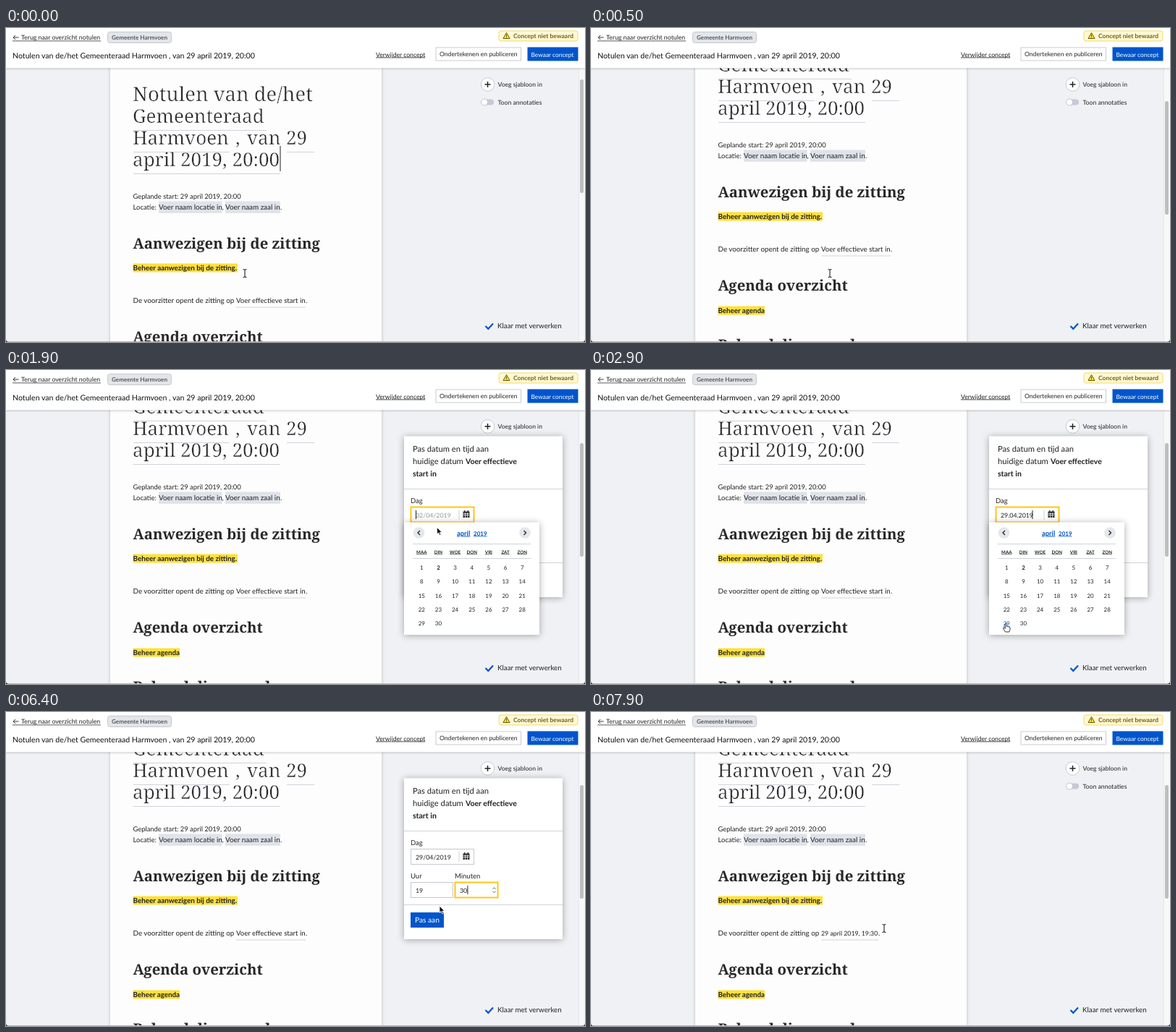
An HTML page for the animation above (8000 ms loop, 800 by 434 pixels).

```html
<!DOCTYPE html>
<html lang="nl">
<head>
<meta charset="utf-8">
<title>Notulen</title>
<style>
html, body { margin: 0; width: 100%; height: 100%; overflow: hidden; background: #eff1f4; }
svg { display: block; width: 800px; height: 434px; }
text { font-family: Lato, "Open Sans", sans-serif; fill: #222; white-space: pre; text-rendering: geometricPrecision; }
.serif { font-family: "Noto Serif", "Liberation Serif", serif; fill: #282828; }
.light { font-weight: 300; stroke: #fdfdfe; stroke-width: .5px; }
.bold { font-weight: 700; }
.link { text-decoration: underline; }
.mid { text-anchor: middle; }
.shadow { filter: drop-shadow(0 1px 5px rgba(0, 0, 0, .33)); }
</style>
</head>
<body>
<svg id="stage" viewBox="0 0 800 434"></svg>
<script>
const LOOP = 8000;
const BLUE = '#0055cc', YELLOW = '#ffc515', LINE = '#cfd3da';
const stage = document.getElementById('stage');

function add(parent, tag, attrs = {}, content) {
  const node = document.createElementNS('http://www.w3.org/2000/svg', tag);
  for (const key in attrs) node.setAttribute(key, attrs[key]);
  if (content !== undefined) node.textContent = content;
  return parent.appendChild(node);
}
const group = (parent, attrs) => add(parent, 'g', attrs);
const rect = (parent, x, y, width, height, fill, extra) =>
  add(parent, 'rect', { x, y, width, height, fill, ...extra });
const box = (parent, x, y, w, h, fill, stroke, extra) =>
  rect(parent, x + .5, y + .5, w - 1, h - 1, fill, { stroke, ...extra });
const text = (parent, x, y, size, content, cls = '', fill) =>
  add(parent, 'text', { x, y, 'font-size': size, class: cls, ...(fill && { style: `fill:${fill}` }) }, content);
const path = (parent, d, stroke, width = 1, fill = 'none') =>
  add(parent, 'path', { d, stroke, 'stroke-width': width, fill });
const show = (node, on) => node.setAttribute('visibility', on ? 'visible' : 'hidden');

// Page
rect(stage, 0, 0, 800, 434, '#eff1f4');
rect(stage, 144, 40, 375, 410, '#fdfdfe', { style: 'filter:drop-shadow(0 0 2px rgba(0,0,0,.22))' });
const doc = group(stage);
const LEFT = 175.5;
const underline = (x, y, w) => rect(doc, x, y, w, 1, LINE);
const titlePart = (x, y, content, size = 26) => text(doc, x, y, size, content, 'serif light');
const heading = (y, content) => text(doc, LEFT, y, 20.3, content, 'serif bold');

underline(176, 141, 184);
underline(176, 171, 133);
underline(388, 171, 38);
underline(176, 201, 203);
titlePart(175, 101, 'Notulen van de/het', 27.4);
titlePart(175, 130.5, 'Gemeenteraad');
titlePart(175, 160.5, 'Harmvoen');
titlePart(317, 160.5, ',');
titlePart(333, 160.5, 'van');
titlePart(387, 160.5, '29');
titlePart(175, 190.5, 'april 2019, 20:00');
const titleCaret = rect(doc, 378.5, 163, 1, 35, '#222');

text(doc, LEFT, 235.7, 9.4, 'Geplande start: 29 april 2019, 20:00');
text(doc, LEFT, 250.5, 9.5, 'Locatie:');
for (const [x, w, label, end] of [[211, 87.5, 'Voer naam locatie in', ','], [303, 76, 'Voer naam zaal in', '.']]) {
  rect(doc, x, 239.5, w, 15, '#dfe3ea');
  underline(x, 254.5, w);
  text(doc, x, 250.5, 9.9, label);
  text(doc, x + w, 250.5, 9.6, end);
}
heading(304.7, 'Aanwezigen bij de zitting');
rect(doc, 175.5, 325.5, 144.5, 12, '#ffe03d');
text(doc, LEFT, 335, 9.87, 'Beheer aanwezigen bij de zitting.', 'bold');
text(doc, LEFT, 380, 9.8, 'De voorzitter opent de zitting op');
const startText = text(doc, 318, 380, 9.6, '');
const startStop = text(doc, 414, 380, 9.6, '.');
const startLine = underline(318, 385.5, 96);
const startCaret = rect(doc, 356, 370, 1, 13, '#222');
heading(434, 'Agenda overzicht');
rect(doc, 175.5, 455.5, 64.5, 12, '#ffe03d');
text(doc, LEFT, 465, 9.75, 'Beheer agenda', 'bold');
heading(516, 'Behandeling van de');

// Scroll bar
rect(stage, 791, 56, 9, 378, '#f8f8f9');
rect(stage, 791, 56, 1, 378, '#e6e7e9');
const thumb = rect(stage, 793, 71, 5, 157, '#bdbec0', { rx: 2.5 });

// Header
rect(stage, 0, 0, 800, 55.5, '#fff', { style: 'filter:drop-shadow(0 1px 1px rgba(0,0,0,.22))' });
path(stage, 'M17.5 13H10M13 10L10 13L13 16', '#222', .9);
text(stage, 21, 16, 8.75, 'Terug naar overzicht notulen');
rect(stage, 9, 17.5, 122, .8, '#333');
box(stage, 140, 5, 89, 16, '#e3e5e8', '#c6c9ce', { rx: 3 });
text(stage, 146, 16.3, 8.1, 'Gemeente Harmvoen', 'bold', '#555b63');
text(stage, 9, 41.5, 10.6, 'Notulen van de/het Gemeenteraad Harmvoen , van 29 april 2019, 20:00', '', '#111');

const actions = group(stage, { transform: 'translate(0 -.5)' });
text(actions, 511, 40, 8.6, 'Verwijder concept', 'link');
box(actions, 593.5, 27, 118.5, 19, '#fff', '#c9ccd1');
text(actions, 599, 39.5, 8.6, 'Ondertekenen en publiceren');
rect(actions, 720.5, 27, 70, 19, BLUE);
text(actions, 725.5, 40, 8.4, 'Bewaar concept', '', '#fff');
box(actions, 680.5, 4, 110, 15, '#fff9d5', '#f2da6b', { rx: 3 });
path(actions, 'M691.5 7L696 15H687Z', '#6b5700', 1, '#ffdf3c');
path(actions, 'M691.5 9.5V12.3M691.5 13V14', '#4d3f00', .9);
text(actions, 701, 14.5, 8.5, 'Concept niet bewaard', 'bold', '#75601a');

// Side tools
add(stage, 'circle', { cx: 665.5, cy: 78, r: 9.3, fill: '#fff', stroke: '#c7cbd1' });
path(stage, 'M661.5 78H669.5M665.5 74V82', '#222', 1.5);
text(stage, 679.5, 81.2, 8.55, 'Voeg sjabloon in');
rect(stage, 657, 98.5, 17, 8, '#c5cad6', { rx: 4 });
add(stage, 'circle', { cx: 661, cy: 102.5, r: 4.5, fill: '#fff', stroke: '#b4b9c3', 'stroke-width': .8 });
text(stage, 679.5, 105.7, 8.7, 'Toon annotaties');
path(stage, 'M662.5 412L666.3 415.8L673 408.5', BLUE, 2.2);
text(stage, 679, 415.2, 9.8, 'Klaar met verwerken');

// Date panel
const panel = group(stage);
rect(panel, 550, 91.5, 219, 222.5, '#fff', { class: 'shadow' });
text(panel, 562, 112.5, 11.2, 'Pas datum en tijd aan');
text(panel, 562, 129.5, 11.2, 'huidige datum');
text(panel, 635, 129.5, 10.5, 'Voer effectieve', 'bold');
text(panel, 562, 146.5, 10.5, 'start in', 'bold');
rect(panel, 550, 164, 219, 1, LINE);
rect(panel, 550, 266, 219, 1, LINE);

function field(x, y, w, label, placeholder) {
  text(panel, x, y - 5, 9.5, label);
  const frame = rect(panel, x + .5, y + .5, w - 1, 21, '#fff');
  const value = text(panel, x + 7, y + 14.5, 8.8, placeholder);
  const caret = rect(panel, 0, y + 5, 1, 12, '#222');
  return (content, focused, caretX) => {
    frame.setAttribute('stroke', focused ? YELLOW : '#c4c8ce');
    frame.setAttribute('stroke-width', focused ? 2 : 1);
    value.textContent = content || placeholder;
    value.style.fill = content ? '#222' : '#999';
    caret.setAttribute('x', caretX || 0);
    show(caret, panelOpen && caretX);
  };
}
let panelOpen = false;
const setDay = field(559, 189, 88, 'Dag', '02/04/2019');
const setHour = field(559, 235, 59, 'Uur', '12');
const setMinute = field(620, 235, 60, 'Minuten', '00');

rect(panel, 625.5, 193, 1, 14, LINE);
box(panel, 631.5, 195.5, 9, 8.5, '#333', '#333');
path(panel, 'M632 198.5H640M632 200.7H640M634.5 197.5V204M637.5 197.5V204', '#fff', .7);
path(panel, 'M633.7 194V197M638.3 194V197', '#333', 1.4);

const spinner = x => path(panel, `M${x - 2} 245L${x} 242.5L${x + 2} 245M${x - 2} 247.5L${x} 250L${x + 2} 247.5`, '#777', 1);
const hourSpinner = spinner(613.5), minuteSpinner = spinner(674.5);
const button = rect(panel, 559, 277, 46, 21, '#b9c1cc');
text(panel, 565, 291, 10.2, 'Pas aan', '', '#fff');

// Calendar
const calendar = group(stage);
rect(calendar, 550, 210.5, 187, 155.5, '#fff', { class: 'shadow' });
for (const [x, dir] of [[570.5, -1], [717, 1]]) {
  add(calendar, 'circle', { cx: x, cy: 225, r: 7.8, fill: '#e4e7eb' });
  path(calendar, `M${x - dir * 1.5} 222L${x + dir * 1.5} 225L${x - dir * 1.5} 228`, '#222', 1.3);
}
text(calendar, 623, 228.5, 9.4, 'april', 'bold link', BLUE);
text(calendar, 646, 228.5, 8, '2019', 'bold link', BLUE);
rect(calendar, 562, 240, 163, 1, LINE);
rect(calendar, 562, 260, 163, 1, LINE);
const column = i => 574.3 + i * 23.15;
['MAA', 'DIN', 'WOE', 'DON', 'VRI', 'ZAT', 'ZON'].forEach((day, i) =>
  text(calendar, column(i), 253.5, 6.2, day, 'mid bold link'));
const days = [];
for (let n = 1; n <= 30; n++) {
  const row = Math.floor((n - 1) / 7);
  days[n] = text(calendar, column((n - 1) % 7), 275.8 + row * 19.4, 7.9, n, n === 2 ? 'mid bold' : 'mid');
}

// Window edge
rect(stage, 0, 433, 800, 1, '#b5b7ba');
add(stage, 'path', { d: 'M0 430Q0 434 4 434H0ZM800 430Q800 434 796 434H800Z', fill: '#222' });

// Pointer shapes
const cursor = group(stage);
const beam = group(cursor), arrow = group(cursor), hand = group(cursor);
const beamShape = 'M-2.5 -5.5Q0 -5.5 0 -4Q0 -5.5 2.5 -5.5M0 -4.5V4.5M-2.5 5.5Q0 5.5 0 4Q0 5.5 2.5 5.5';
path(beam, beamShape, '#fff', 2.4);
path(beam, beamShape, '#222', 1.1);
path(arrow, 'M0 0V9.5L2.2 7.5L3.8 11L5.4 10.3L3.9 7H6.8Z', '#fff', .8, '#111');
path(hand, 'M-1.7 -5C-1.7 -6.6 .3 -6.6 .3 -5V-1.5Q1.2 -2.5 2 -1.2Q3 -2 3.6 -.7Q5 -1 5 .6V2.5L3.8 6H-1.4L-4.6 1.2Q-4.4 -.7 -2.8 .5L-1.7 1.5Z', '#222', .9, '#fff');

// time, x, y, shape held until the next row
const TRACK = [
  [0, 330, 339, beam], [500, 330, 339, beam], [780, 357, 307, beam], [900, 357, 307, arrow],
  [1100, 590, 252, beam], [1200, 624, 246, beam], [1500, 598, 201, beam], [1800, 598, 201, arrow],
  [2300, 574, 356, hand], [2950, 574, 356, arrow], [3400, 580, 247, beam], [5050, 580, 247, beam],
  [5350, 646, 247, beam], [6150, 646, 247, arrow], [6400, 599, 268, arrow],
  [6600, 583, 289, hand], [7000, 583, 289, arrow], [7200, 518, 292, beam],
  [7600, 412, 297, beam], [7800, 405, 299, beam], [8000, 405, 299, beam]
];
const ease = p => p * p * (3 - 2 * p);
const progress = (t, from, to) => Math.min(1, Math.max(0, (t - from) / (to - from)));
const within = (t, from, to) => t >= from && t < to;
const blink = (t, start) => (t - start) % 1000 < 500;

function pointerAt(t) {
  const i = TRACK.findIndex(row => row[0] > t);
  const [t0, x0, y0, shape] = TRACK[i - 1], [t1, x1, y1] = TRACK[i];
  const p = ease(progress(t, t0, t1));
  return { x: x0 + (x1 - x0) * p, y: y0 + (y1 - y0) * p, shape };
}

function render(t) {
  const scroll = 1 - (1 - progress(t, 50, 450)) ** 2;
  doc.setAttribute('transform', `translate(0 ${-71 * scroll})`);
  thumb.setAttribute('y', 71 + 30 * scroll);
  show(titleCaret, t < 400);
  show(startCaret, within(t, 800, 1700) && blink(t, 800));

  const done = t >= 7000;
  const end = done ? 397 : 414;
  startText.textContent = done ? '29 april 2019, 19:30' : 'Voer effectieve start in';
  startText.setAttribute('font-size', done ? 8.75 : 9.6);
  startStop.setAttribute('x', end);
  startLine.setAttribute('width', end - 318);

  panelOpen = within(t, 900, 7000);
  const calendarOpen = within(t, 1700, 3100), picked = t >= 2500;
  const dayFocus = within(t, 1700, 3500), hourFocus = within(t, 3500, 5400), minuteFocus = within(t, 5400, 6900);
  const hour = t < 4700 ? '' : t < 4900 ? '1' : '19';
  const minute = t < 5800 ? '' : t < 6000 ? '3' : '30';
  const day = !picked ? '' : dayFocus ? '29.04.2019' : '29/04/2019';
  show(panel, panelOpen);
  show(calendar, calendarOpen);
  setDay(day, dayFocus, dayFocus && blink(t, picked ? 2500 : 1700) && (picked ? 609.5 : 566));
  setHour(hour, hourFocus, hourFocus && blink(t, t < 4700 ? 3600 : 4700) && 566 + hour.length * 5.2);
  setMinute(minute, minuteFocus, minuteFocus && blink(t, t < 6000 ? 5400 : 6000) && 627 + minute.length * 5.2);
  button.setAttribute('fill', minute ? BLUE : '#b9c1cc');

  const { x, y, shape } = pointerAt(t);
  const overHour = within(x, 559, 627) && within(y, 235, 257);
  show(hourSpinner, panelOpen && (hourFocus || overHour && !minuteFocus));
  show(minuteSpinner, panelOpen && minuteFocus);
  const overPick = calendarOpen && shape === hand;
  days[29].style.fill = overPick ? BLUE : '';
  days[29].style.textDecoration = overPick ? 'underline' : '';
  cursor.setAttribute('transform', `translate(${x} ${y})`);
  for (const kind of [beam, arrow, hand]) show(kind, kind === shape);
}

const start = performance.now();
function tick() {
  render((performance.now() - start) % LOOP);
  requestAnimationFrame(tick);
}
tick();
</script>
</body>
</html>
```
